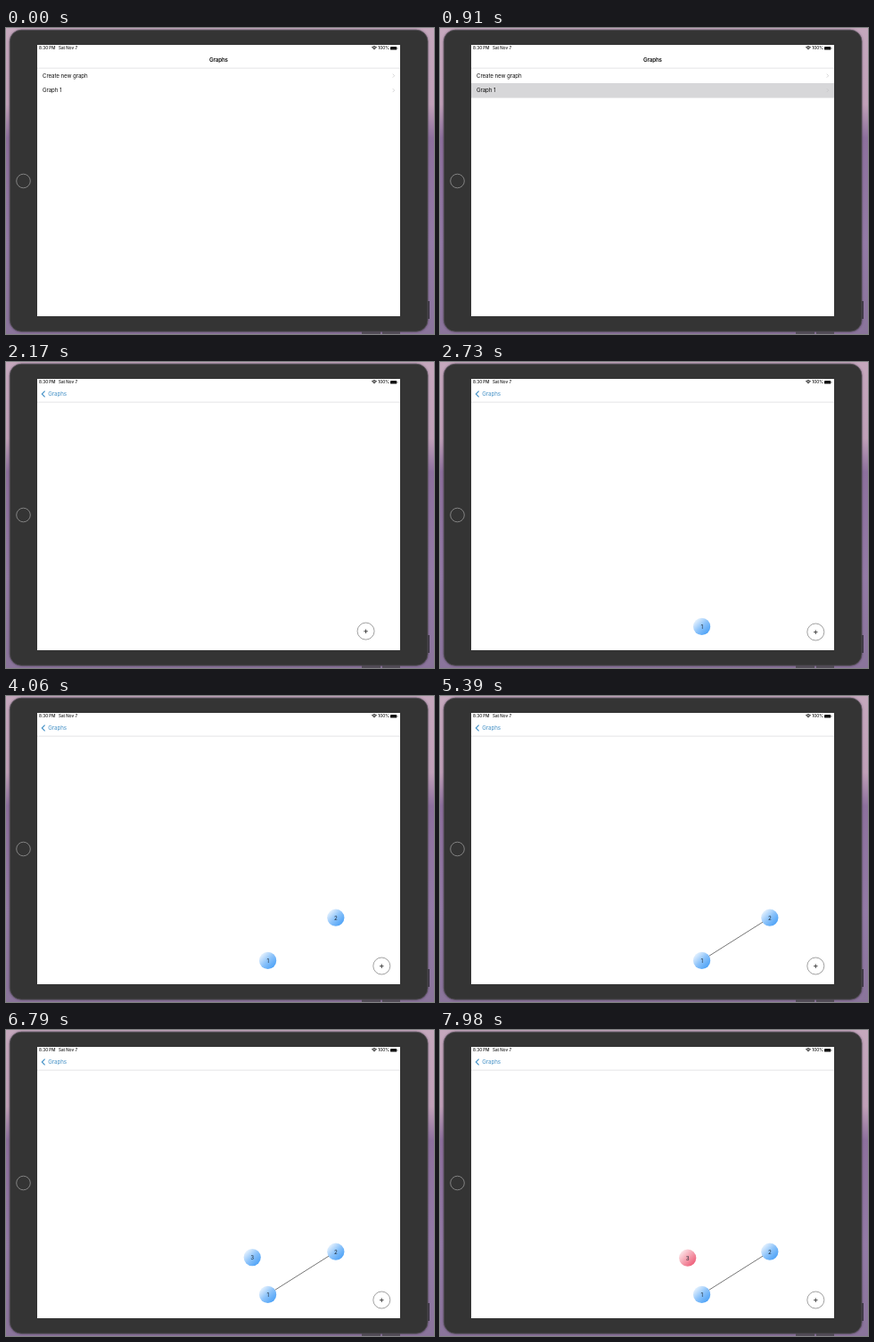
Animation of 480 by 344 pixels, one loop 8000 ms. Source, as an HTML page with a canvas:

```html
<!DOCTYPE html>
<html lang="en">
<head>
<meta charset="utf-8">
<title>Graph editor</title>
<style>
html, body { margin: 0; width: 100%; height: 100%; overflow: hidden; }
canvas { display: block; width: 480px; height: 344px; }
</style>
</head>
<body>
<canvas></canvas>
<script>
const LOOP = 8000, TICK = 70;
const SCREEN = { x: 35, y: 19, w: 407, h: 305 };
const NAV_BOTTOM = 45;
const LINK = '#4390c6';
const HOME = { x: 421.3, y: 303.5 };
const BLUE = ['#e4f1fe', '#8cc3fa', '#4fa3f7'];
const RED = ['#fde3e7', '#f5a0af', '#ee5f7a'];

const node1 = { x: 293.6, y: 297.4 };
const node2 = { x: 369.8, y: 249.2 };
const node3 = { x: 276.2, y: 255.6 };
const node3Rest = { x: 277.7, y: 256.2 };

// The plus button is dragged to `to`, held, then dropped as a node.
const drags = [
  { start: 2170, end: 2380, drop: 2730, to: { x: 307.7, y: 297.6 } },
  { start: 3500, end: 3850, drop: 3920, to: node2 },
  { start: 6440, end: 6720, drop: 6790, to: node3 },
];

const canvas = document.querySelector('canvas');
const ctx = canvas.getContext('2d');
const scale = window.devicePixelRatio || 1;
canvas.width = 480 * scale;
canvas.height = 344 * scale;

const clamp = v => Math.min(1, Math.max(0, v));
const ease = v => v * v * (3 - 2 * v);
const mix = (a, b, p) => a + (b - a) * p;
const mixPoint = (a, b, p) => ({ x: mix(a.x, b.x, p), y: mix(a.y, b.y, p) });

function rect(x, y, w, h, color) {
  ctx.fillStyle = color;
  ctx.fillRect(x, y, w, h);
}

function text(str, x, y, { size = 6.2, weight = 400, color = '#111', align = 'left', alpha = 1 } = {}) {
  ctx.save();
  ctx.globalAlpha = alpha;
  ctx.font = `${weight} ${size}px Inter, Roboto, sans-serif`;
  ctx.letterSpacing = size > 5 ? '-0.1px' : '0px';
  ctx.textAlign = align;
  ctx.fillStyle = color;
  ctx.fillText(str, x, y);
  ctx.restore();
}

function line(points, color, width) {
  ctx.beginPath();
  points.forEach(([x, y]) => ctx.lineTo(x, y));
  ctx.strokeStyle = color;
  ctx.lineWidth = width;
  ctx.stroke();
}

function circle(x, y, r) {
  ctx.beginPath();
  ctx.arc(x, y, r, 0, Math.PI * 2);
}

function linear(x0, y0, x1, y1, stops) {
  const gradient = ctx.createLinearGradient(x0, y0, x1, y1);
  stops.forEach(([at, color]) => gradient.addColorStop(at, color));
  return gradient;
}

function drawTablet() {
  rect(0, 0, 480, 344, linear(0, 0, 0, 344,
    [[0, '#c5a8bd'], [0.25, '#c0a0b8'], [0.36, '#8d709d'], [0.7, '#937aa6'], [1, '#8a749b']]));
  rect(399, 341, 21, 3, '#55505a');
  rect(422, 341, 20, 3, '#55505a');
  rect(473, 307, 2, 20, '#3d3944');

  ctx.save();
  ctx.shadowColor = 'rgba(40, 25, 50, 0.6)';
  ctx.shadowBlur = 3 * scale;
  ctx.beginPath();
  ctx.roundRect(4.3, 2.2, 468.7, 339, 13);
  ctx.fillStyle = '#343434';
  ctx.fill();
  ctx.restore();
  ctx.strokeStyle = '#57535a';
  ctx.lineWidth = 0.8;
  ctx.stroke();

  circle(19.5, 172, 7.8);
  ctx.strokeStyle = '#8b8b8b';
  ctx.lineWidth = 0.9;
  ctx.stroke();
}

function drawStatusBar() {
  const style = { size: 4.6, weight: 500 };
  text('8:30 PM', 37, 24.4, style);
  text('Sat Nov 7', 59, 24.4, style);
  text('100%', 417.3, 24.4, style);
  for (const r of [1.2, 2.6, 4]) {
    ctx.beginPath();
    ctx.arc(413, 24.7, r, -Math.PI * 0.75, -Math.PI * 0.25);
    ctx.strokeStyle = '#111';
    ctx.lineWidth = 0.9;
    ctx.stroke();
  }
  ctx.beginPath();
  ctx.roundRect(431, 21, 7.3, 3.6, 0.9);
  ctx.fillStyle = '#111';
  ctx.fill();
  rect(438.7, 22.1, 0.6, 1.4, '#555');
}

function drawNav(p) {
  const center = mix(238.4, 57.6, p);
  const shown = clamp(p * 1.4 - 0.4);
  text('Graphs', center, 38.2, { weight: 600, align: 'center', alpha: 1 - shown });
  text('Graphs', center, 38.2, { color: LINK, align: 'center', alpha: shown });
  ctx.globalAlpha = shown;
  line([[43.6, 32.6], [40.3, 36], [43.6, 39.4]], LINK, 1.1);
  ctx.globalAlpha = 1;
  rect(SCREEN.x, NAV_BOTTOM - 0.3, SCREEN.w, 0.8, '#dedee0');
}

function drawList(t) {
  rect(SCREEN.x, NAV_BOTTOM, SCREEN.w, 279, '#fff');
  if (t >= 840) rect(SCREEN.x, 62, SCREEN.w, 16.6, t < 910 ? '#e4e4e6' : '#d7d7d9');
  [['Create new graph', 56], ['Graph 1', 72.4]].forEach(([label, y]) => {
    text(label, 41, y);
    line([[433.7, y - 4.3], [435.7, y - 2.3], [433.7, y - 0.3]], '#c4c4c8', 0.7);
  });
}

function drawNode({ x, y }, label, colors) {
  const r = 9.6, d = r * 0.72;
  circle(x, y, r);
  ctx.fillStyle = linear(x - d, y - d, x + d, y + d, colors.map((c, i) => [i / 2, c]));
  ctx.fill();
  text(label, x, y + 2.3, { color: '#1c2833', align: 'center' });
}

function drawButton({ x, y }) {
  circle(x, y, 9.5);
  ctx.fillStyle = '#fff';
  ctx.fill();
  ctx.strokeStyle = '#777';
  ctx.lineWidth = 0.7;
  ctx.stroke();
  line([[x - 2.3, y + 0.2], [x + 2.3, y + 0.2]], '#222', 0.8);
  line([[x, y - 2.1], [x, y + 2.5]], '#222', 0.8);
}

function buttonAt(t) {
  const drag = drags.find(d => t >= d.start && t < d.drop);
  if (!drag) return HOME;
  const p = clamp((t - drag.start + TICK) / (drag.end - drag.start + TICK));
  return mixPoint(HOME, drag.to, ease(p));
}

function drawEditor(t) {
  rect(SCREEN.x, NAV_BOTTOM, SCREEN.w, 279, '#fff');
  if (t >= 5180) line([[node1.x, node1.y], [node2.x, node2.y]], '#555', 0.8);
  if (t >= drags[0].drop) drawNode(node1, '1', BLUE);
  if (t >= drags[1].drop) drawNode(node2, '2', t >= 4690 && t < 5320 ? RED : BLUE);
  if (t >= drags[2].drop) {
    const settle = ease(clamp((t - 6790) / 350));
    drawNode(mixPoint(node3, node3Rest, settle), '3', t >= 7700 ? RED : BLUE);
  }
  drawButton(buttonAt(t));
}

// The push is a critically damped spring that only refreshes at a few moments.
function pushProgress(t) {
  if (t < 1050) return 0;
  if (t >= 1540) return 1;
  const sample = [1470, 1190, 1050].find(s => t >= s);
  const w = (sample - 1020) * 0.0138;
  return 1 - (1 + w) * Math.exp(-w);
}

function draw(time) {
  const t = Math.floor(time / TICK) * TICK;
  const p = pushProgress(t);
  ctx.setTransform(scale, 0, 0, scale, 0, 0);
  drawTablet();

  ctx.save();
  ctx.beginPath();
  ctx.rect(SCREEN.x, SCREEN.y, SCREEN.w, SCREEN.h);
  ctx.clip();
  rect(SCREEN.x, SCREEN.y, SCREEN.w, SCREEN.h, '#fff');
  if (p < 1) {
    const shift = -0.3 * SCREEN.w * p;
    ctx.save();
    ctx.translate(shift, 0);
    drawList(t);
    ctx.restore();
    rect(SCREEN.x, NAV_BOTTOM, SCREEN.w, 279, `rgba(0, 0, 0, ${0.1 * p ** 12})`);
  }
  if (p > 0) {
    ctx.save();
    ctx.translate(SCREEN.w * (1 - p), 0);
    drawEditor(t);
    ctx.restore();
  }
  drawNav(p);
  drawStatusBar();
  ctx.restore();
}

const began = performance.now();
function frame() {
  draw((performance.now() - began) % LOOP);
  requestAnimationFrame(frame);
}
frame();
</script>
</body>
</html>
```
